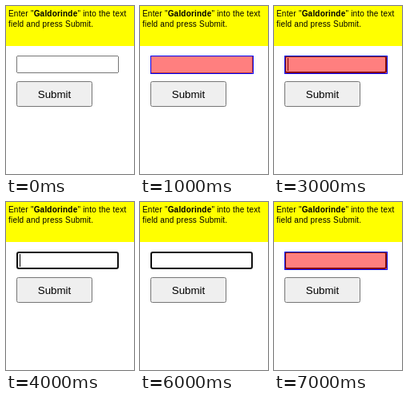
Write an HTML page that moves like this. It is 160 px wide and 210 px high and loops after 8000 ms.

```html
<!DOCTYPE html>
<html lang="en">
<head>
<meta charset="utf-8">
<title>Enter text</title>
<style>
  html, body { margin: 0; width: 100%; height: 100%; overflow: hidden; background: #fff; }
  body { position: relative; font-family: "Liberation Sans", Arial, sans-serif; }
  body * { position: absolute; box-sizing: border-box; margin: 0; pointer-events: none; }
  #query { left: 0; top: 0; width: 160px; height: 50px; padding: 3px; background: #ff0; color: #000; font-size: 10px; line-height: 13px; letter-spacing: .2px; white-space: nowrap; }
  #query b { position: static; }
  #field, #ring { left: 13px; top: 62px; width: 128px; height: 22px; }
  #ring { outline: auto 1px -webkit-focus-ring-color; }
  #caret { left: 17px; top: 65px; width: 1px; height: 16px; background: #000; }
  #mark { left: 13px; top: 62px; width: 129px; height: 23px; border: 1px solid #00f; background: rgba(255, 0, 0, .5) padding-box; }
  #submit { left: 13px; top: 94px; width: 95px; height: 32px; font: 13.3333px "Liberation Sans", Arial, sans-serif; }
</style>
</head>
<body>
<div id="query">Enter "<b>Galdorinde</b>" into the text<br>field and press Submit.</div>
<input id="field" type="text" tabindex="-1" readonly>
<input id="ring" type="text" tabindex="-1" readonly>
<div id="caret"></div>
<div id="mark"></div>
<button id="submit" type="button" tabindex="-1">Submit</button>
<script>
  const STEP = 1000;

  // One digit per second: 1 = visible, 0 = hidden.
  const visible = {
    ring:  "00111111",
    caret: "00111100",
    mark:  "01010101"
  };

  for (const [id, steps] of Object.entries(visible)) {
    const frames = [...steps, steps.at(-1)].map((opacity, i) => ({
      opacity, offset: i / steps.length, easing: "step-end"
    }));
    document.getElementById(id).animate(frames, {
      duration: steps.length * STEP, iterations: Infinity
    });
  }
</script>
</body>
</html>
```
